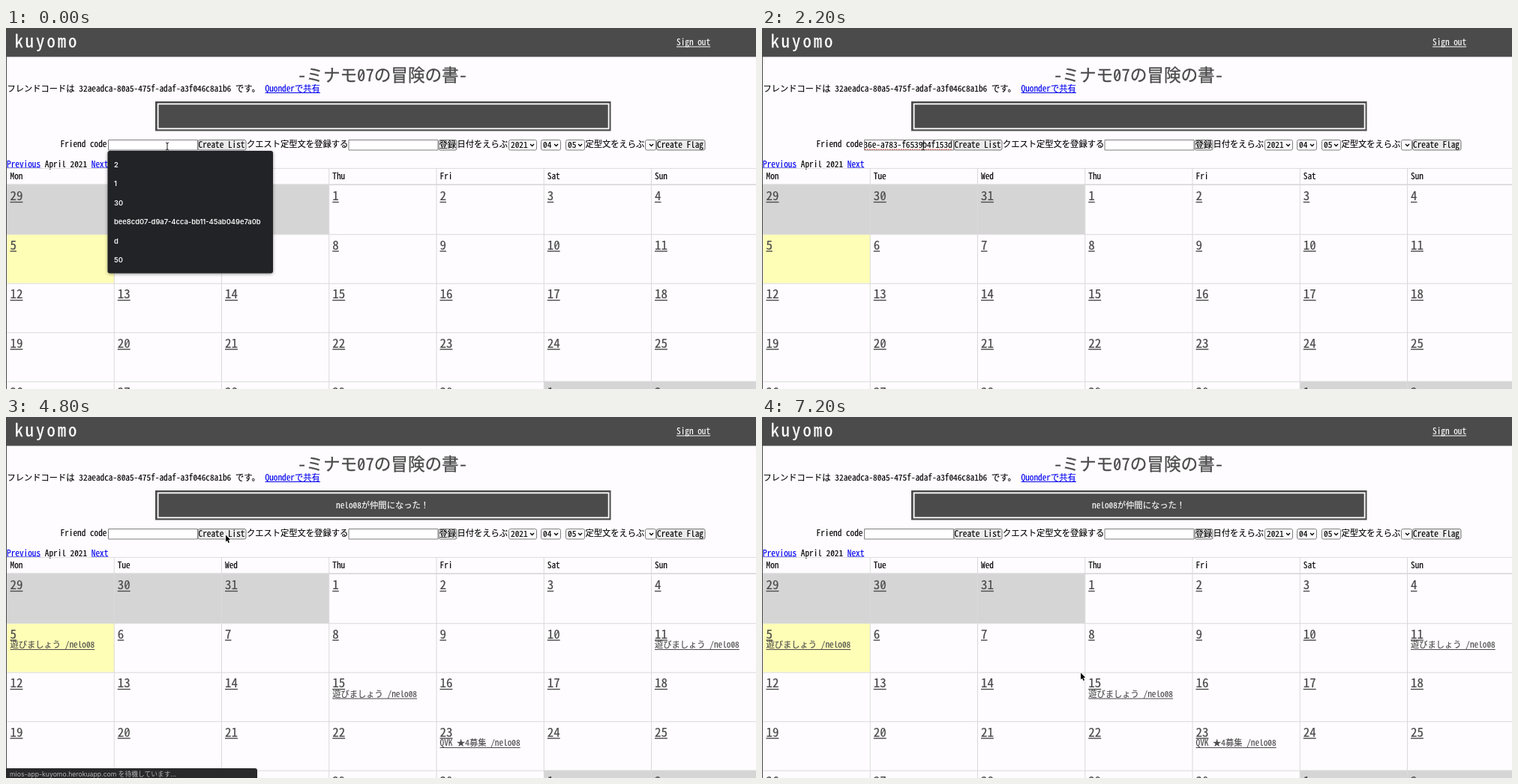
An HTML page with a canvas that plays this animation: 1000 by 482 pixels, repeating every 7300 ms.

```html
<!DOCTYPE html>
<html lang="ja">
<head>
<meta charset="utf-8">
<title>Calendar</title>
<style>
  html, body { margin: 0; width: 100%; height: 100%; overflow: hidden; background: #fefcfe; }
  canvas { display: block; width: 100%; height: 100%; }
</style>
</head>
<body>
<canvas id="stage" width="1000" height="482"></canvas>
<script>
const ctx = document.getElementById('stage').getContext('2d');
const LOOP = 7300, STEP = 100;
const MONO = '"Noto Sans Mono CJK JP", "Noto Sans Mono", "Noto Sans CJK JP", "Noto Sans CJK", monospace';
const WIDE = '"Noto Sans CJK JP", "Noto Sans CJK", "Noto Sans Mono CJK JP", sans-serif';
const SANS = 'Inter, "Noto Sans CJK JP", "Noto Sans CJK", sans-serif';
const EM = 11.28;
const INK = '#000', DARK = '#4b4b4b', LINK = '#0000ee', WHITE = '#fff';

// Latin letters take half the width of a kana
ctx.font = `100px ${MONO}`;
const latinScale = 50 / ctx.measureText('0').width;

const COL = 143.25, ROW = 65.5, TOP = 209.7;
const colX = c => 1 + c * COL;
const rowY = r => TOP + r * ROW;

const CODE = '3d1b2ca0-d4cb-436e-a783-f6539b4f153d';
const FRIEND = 'nelo08';
const PLAY = `遊びましょう /${FRIEND}`;
const EVENTS = [[0, 1, PLAY], [6, 1, PLAY], [3, 2, PLAY], [4, 3, `QVK ★4募集 /${FRIEND}`]];
const SUGGESTIONS = ['2', '1', '30', 'bee8cd07-d9a7-4cca-bb11-45ab049e7a0b', 'd', '50'];

const AT = { paste: 2000, blur: 3300, wait: 3500, done: 4400, fade: 4900, gone: 5400 };

// Pointer path: time, x, y
const PATH = [
  [2600, 215, 158], [3200, 293, 157.5], [5300, 293, 157.5], [5600, 498, 112],
  [5900, 612, 84], [6200, 596, 87], [6500, 596, 87], [7000, 425, 341.5]
];

function rect(x, y, w, h, color) {
  ctx.fillStyle = color;
  ctx.fillRect(x, y, w, h);
}

// The digit zero carries a slash
function slashZeros(run, x, y, size, advance) {
  ctx.beginPath();
  [...run].forEach((ch, i) => {
    if (ch !== '0') return;
    const left = x + i * advance;
    ctx.moveTo(left + size * 0.14, y - size * 0.16);
    ctx.lineTo(left + size * 0.36, y - size * 0.57);
  });
  ctx.lineWidth = size * 0.06;
  ctx.stroke();
}

function text(str, x, y, { size = EM, color = INK, line = 0, space = 0 } = {}) {
  const start = x;
  ctx.fillStyle = ctx.strokeStyle = color;
  ctx.letterSpacing = space + 'px';
  for (const run of str.match(/[\x20-\x7e]+|[^\x20-\x7e]+/g)) {
    const latin = run.charCodeAt(0) < 127;
    const advance = size * (latin ? 0.5 : 1) + space;
    ctx.font = latin ? `${size * latinScale}px ${MONO}` : `${size}px ${WIDE}`;
    ctx.fillText(run, x, y);
    ctx.lineWidth = size * 0.012;
    ctx.strokeText(run, x, y);
    if (latin) slashZeros(run, x, y, size, advance);
    x += run.length * advance;
  }
  ctx.letterSpacing = '0px';
  if (line) rect(start, y + line, x - start, size > 14 ? 1.4 : 1, color);
  return x;
}

function sans(str, x, y, size, color, weight = 400) {
  ctx.font = `${weight} ${size}px ${SANS}`;
  ctx.fillStyle = color;
  ctx.fillText(str, x, y);
}

function box(x, w, fill, edge, radius) {
  ctx.beginPath();
  ctx.roundRect(x + 0.5, 149.5, w - 1, 13.5, radius);
  ctx.fillStyle = fill;
  ctx.fill();
  ctx.strokeStyle = edge;
  ctx.lineWidth = 1;
  ctx.stroke();
}

const field = x => box(x, 120, WHITE, '#808080', 0);

function button(label, x, w, off = false) {
  box(x, w, off ? '#f6f5f6' : '#ececec', off ? '#cfcfcf' : '#777', 2);
  text(label, x + 1, 160, { color: off ? '#aaa' : INK });
}

function select(label, x, w) {
  box(x, w, '#fbfafb', '#808080', 2);
  if (label) text(label, x + 3, 160);
  const cx = x + w - 6.5;
  ctx.beginPath();
  ctx.moveTo(cx - 2.5, 155);
  ctx.lineTo(cx, 157.5);
  ctx.lineTo(cx + 2.5, 155);
  ctx.strokeStyle = INK;
  ctx.lineWidth = 1.3;
  ctx.stroke();
}

function drawHeader(done) {
  rect(0, 0, 1000, 38.5, DARK);
  text('kuyomo', 11.5, 25.5, { size: 22.6, color: WHITE, space: 3 });
  text('Sign out', 894, 23, { color: WHITE, line: 1.5 });
  text('-ミナモ07の冒険の書-', 389, 71, { size: 22.6, color: DARK });
  const x = text('フレンドコードは 32aeadca-80a5-475f-adaf-a3f046c8a1b6 です。 ', 1.5, 84.5);
  text('Quonderで共有', x, 84.5, { color: LINK, line: 1.5 });

  rect(199, 98, 607.5, 39.5, DARK);
  ctx.strokeStyle = WHITE;
  ctx.lineWidth = 1.8;
  ctx.strokeRect(202.6, 101.4, 601, 33);
  if (done) text(`${FRIEND}が仲間になった！`, 440, 122, { color: WHITE });
}

function drawForm(t) {
  const busy = t >= AT.blur && t < AT.done;
  text('Friend code', 72.5, 158.5);
  field(136);
  if (t >= AT.paste && t < AT.done) {
    const focus = t < AT.blur;
    ctx.save();
    ctx.beginPath();
    ctx.rect(137, 148, 118, 17);
    ctx.clip();
    text(CODE, focus ? 254 - CODE.length * EM / 2 : 136.5, 160);
    if (focus) for (let x = 137; x < 254; x += 3) rect(x, 161.5, 1.5, 1.3, '#e2493f');
    ctx.restore();
  }
  button('Create List', 255.5, 65, busy);
  text('クエスト定型文を登録する', 321, 158.5);
  field(456.5);
  button('登録', 576.5, 25);
  text('日付をえらぶ', 601.5, 158.5);
  select('2021', 670, 38);
  select('04', 713, 27);
  select('05', 746, 26);
  text('定型文をえらぶ', 772.5, 158.5);
  select('', 852, 15);
  button('Create Flag', 867, 65.5);
}

function drawCalendar(done) {
  let x = text('Previous', 1, 185.5, { color: LINK, line: 1 });
  x = text(' April 2021 ', x, 185.5);
  text('Next', x, 185.5, { color: LINK, line: 1 });

  rect(1, TOP, 3 * COL, ROW, '#d5d5d5');
  rect(colX(5), rowY(4), 300, ROW, '#d5d5d5');
  rect(1.5, rowY(1), COL - 0.5, ROW, '#fffeb6');

  rect(1, 187, 999, 1, '#dedede');
  rect(1, 208.3, 999, 1.7, '#d9d9d9');
  for (let r = 1; r < 5; r++) rect(1, rowY(r), 999, 1, '#dadada');
  for (let c = 1; c < 7; c++) rect(colX(c) - 0.5, 187, 1, 295, '#dadada');

  'Mon Tue Wed Thu Fri Sat Sun'.split(' ').forEach((name, c) => text(name, colX(c) + 4.5, 202));
  for (let i = 0; i < 35; i++) {
    const n = i - 2;
    const day = n < 1 ? n + 31 : n > 30 ? n - 30 : n;
    text(String(day), colX(i % 7) + 4.5, rowY(Math.floor(i / 7)) + 20.3,
      { size: EM * 1.5, color: DARK, line: 1.8 });
  }
  if (done) for (const [c, r, label] of EVENTS) {
    text(label, colX(c) + 4.5, rowY(r) + 33.1, { color: DARK, line: 1.7 });
  }
}

function drawSuggestions() {
  ctx.save();
  ctx.shadowColor = 'rgba(0,0,0,.4)';
  ctx.shadowBlur = 4;
  ctx.shadowOffsetY = 1;
  ctx.beginPath();
  ctx.roundRect(135.5, 164, 220.5, 163.5, 3);
  ctx.fillStyle = '#222327';
  ctx.fill();
  ctx.restore();
  SUGGESTIONS.forEach((s, i) => sans(s, 144, 186 + i * 25.4, 9.3, '#f4f4f4', 600));
}

function drawStatus(t) {
  if (t < AT.wait || t >= AT.gone) return;
  ctx.save();
  ctx.globalAlpha = t < AT.fade ? 1 : 0.12 * (AT.gone - t) / (AT.gone - AT.fade);
  ctx.beginPath();
  ctx.roundRect(-4, 469, 339, 20, 3);
  ctx.fillStyle = '#29292c';
  ctx.fill();
  sans('mios-app-kuyomo.herokuapp.com を待機しています...', 5, 479.5, 8.7, '#b4b4b6');
  ctx.restore();
}

function pointerAt(t) {
  const i = PATH.findIndex(p => p[0] > t);
  if (i === 0) return PATH[0].slice(1);
  if (i < 0) return PATH[PATH.length - 1].slice(1);
  const [t0, x0, y0] = PATH[i - 1], [t1, x1, y1] = PATH[i];
  const k = (t - t0) / (t1 - t0), e = k * k * (3 - 2 * k);
  return [x0 + (x1 - x0) * e, y0 + (y1 - y0) * e];
}

function drawPointer(t) {
  const [x, y] = pointerAt(t);
  ctx.save();
  ctx.translate(x, y);
  ctx.beginPath();
  if (x < 255) {
    ctx.moveTo(-2, -5);
    ctx.quadraticCurveTo(0, -5, 0, -3.5);
    ctx.quadraticCurveTo(0, -5, 2, -5);
    ctx.moveTo(0, -4);
    ctx.lineTo(0, 4);
    ctx.moveTo(-2, 5);
    ctx.quadraticCurveTo(0, 5, 0, 3.5);
    ctx.quadraticCurveTo(0, 5, 2, 5);
    ctx.strokeStyle = '#222';
    ctx.lineWidth = 1;
    ctx.stroke();
  } else {
    const arrow = [0, 0, 0, 9, 2, 7.2, 3.4, 10.6, 5, 10, 3.5, 6.6, 6.2, 6.4];
    for (let i = 0; i < arrow.length; i += 2) ctx.lineTo(arrow[i], arrow[i + 1]);
    ctx.closePath();
    ctx.strokeStyle = WHITE;
    ctx.lineWidth = 1.4;
    ctx.stroke();
    ctx.fillStyle = INK;
    ctx.fill();
  }
  ctx.restore();
}

function draw(t) {
  const done = t >= AT.done;
  rect(0, 0, 1000, 482, '#fefcfe');
  drawHeader(done);
  drawForm(t);
  drawCalendar(done);
  rect(0, 0, 1, 482, '#484848');
  if (t < AT.paste) drawSuggestions();
  drawStatus(t);
  drawPointer(t);
}

function tick() {
  const t = performance.now() % LOOP;
  draw(Math.floor(t / STEP) * STEP);
  requestAnimationFrame(tick);
}
tick();
</script>
</body>
</html>
```
